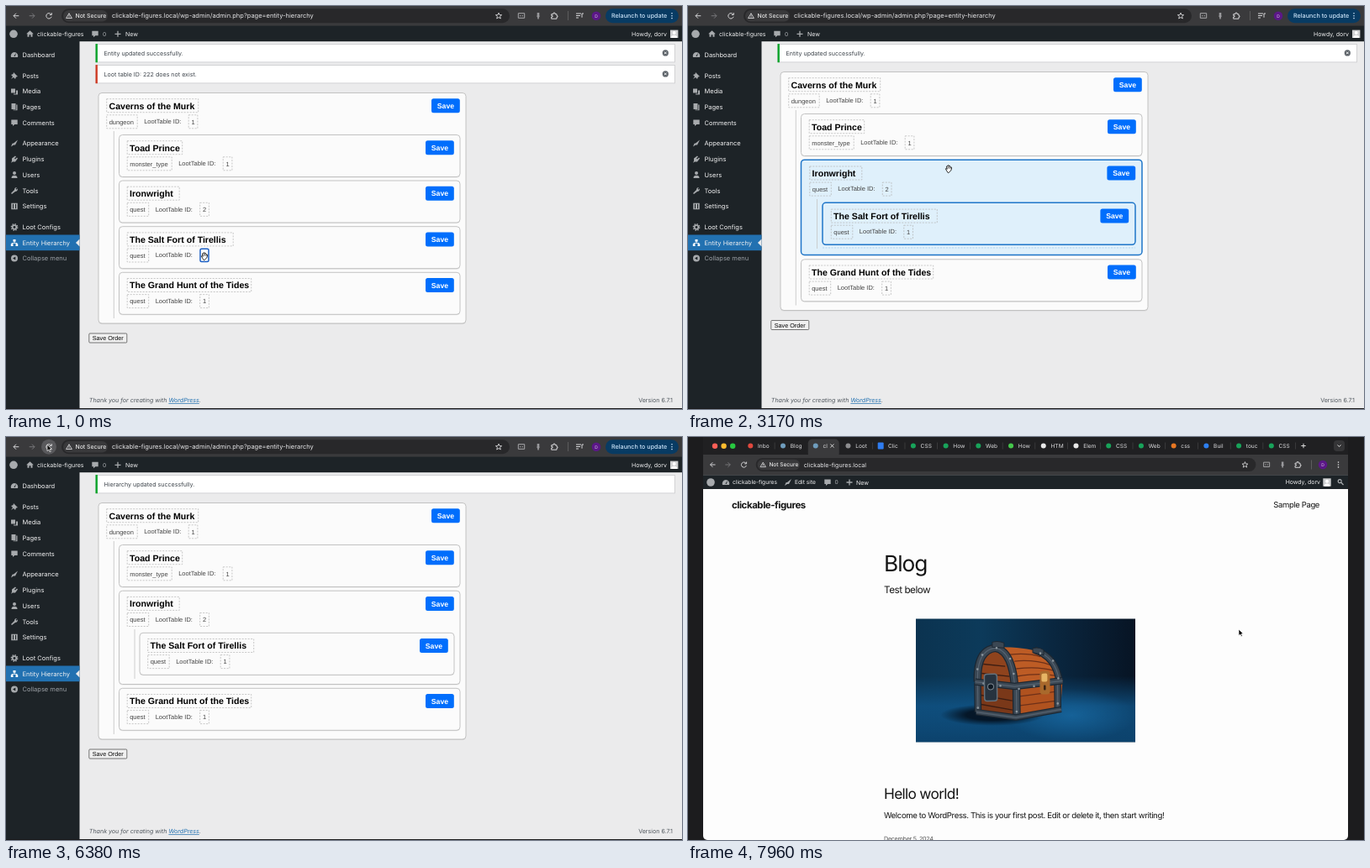
Write an HTML page that moves like this. It is 804 by 480 pixels and loops after 8 s.

```html
<!DOCTYPE html>
<html lang="en">
<head>
<meta charset="utf-8">
<title>Entity hierarchy</title>
<style>
  html, body { margin: 0; width: 100%; height: 100%; overflow: hidden; background: #1d1e20; }
  svg { display: block; width: 804px; height: 480px; }
  text { font-family: Inter, "Open Sans", sans-serif; text-rendering: geometricPrecision; white-space: pre; }
  .arial { font-family: "Liberation Sans", Arial, sans-serif; }
  .tight text { letter-spacing: -.04em; }
</style>
</head>
<body>
<svg viewBox="0 0 804 480">
  <g id="scene"></g>
  <g id="cursor"></g>
</svg>
<script>
const LOOP = 8000, BLOG_AT = 6670;
const SITE = 'clickable-figures', GREETING = 'Howdy, dorv';
const scene = document.getElementById('scene');
const cursor = document.getElementById('cursor');

// Drawing helpers: each returns SVG markup
const rect = (x, y, w, h, fill, more = '') =>
  `<rect x="${x}" y="${y}" width="${w}" height="${h}" fill="${fill}" ${more}/>`;
const circle = (x, y, r, fill, more = '') => `<circle cx="${x}" cy="${y}" r="${r}" fill="${fill}" ${more}/>`;
const path = (d, fill, more = '') => `<path d="${d}" fill="${fill}" ${more}/>`;
const line = (d, stroke, width = 1, more = '') => path(d, 'none', `stroke="${stroke}" stroke-width="${width}" ${more}`);
const at = (x, y, body, scale = 1) => `<g transform="translate(${x} ${y}) scale(${scale})">${body}</g>`;
// y is the vertical middle of the capitals
const text = (x, y, str, size, fill, more = '') =>
  `<text x="${x}" y="${y + size * 0.36}" font-size="${size}" fill="${fill}" ${more}>${str}</text>`;
const arial = (x, y, str, size, fill, more = '') => text(x, y, str, size, fill, `class="arial" ${more}`);

// Small icons, centred on the origin
const icon = {
  pin: 'M-1-4L4 1L2 1.5L1 4L-1 2L-4 4L-2 1L-4-1L-1.5-2Z',
  media: 'M-4-3H1V2H-4ZM2-1H4V4H-1V3H2Z',
  pages: 'M-3.5-4H1.5V3H-3.5ZM2.2-2.5H3.5V4.2H-1.5V3.5H2.2Z',
  comment: 'M-3.7-3.5H3.7V2H.3L-2 4V2H-3.7Z',
  brush: 'M4-4L1 2L-1 2L-4 4L-2.5 .3L-1 0Z',
  plug: 'M1-4L2-3L0-1L1 0L3-2L4-1L1 3H-2L-4 4.3L-3 2V-1Z',
  user: 'M0-4A2 2 0 0 1 0 0A2 2 0 0 1 0-4M-3.5 4Q-3.5 .8 0 .8T3.5 4Z',
  wrench: 'M-4 3L0-1Q0-4 3-4L1.5-2.2L2.5-1.2L4-2.8Q4 1 1 1L-3 4Z',
  sliders: 'M-3.7-3.7H3.7V3.7H-3.7ZM-2-2.7V2.7H-1V-2.7ZM1-2.7V2.7H2V-2.7Z',
  tree: 'M-1.5-4H1.5V-1.2H.4V0H3.3V1.2H4.2V4H1.5V1.2H2.4V.8H-2.4V1.2H-1.5V4H-4.2V1.2H-3.3V0H-.4V-1.2H-1.5Z',
  home: 'M0-4L4.3 0H3V3.5H1V1H-1V3.5H-3V0H-4.3Z',
  dial: 'M-4 3A4.3 4.3 0 1 1 4 3ZM-.6 1.6L2-2L.8 2Z',
  collapse: 'M0-4A4 4 0 0 1 0 4A4 4 0 0 1 0-4M1.3-2L-2 0L1.3 2Z',
  star: 'M0-3.6L1-1.1L3.6-1L1.6 .7L2.3 3.3L0 1.8L-2.3 3.3L-1.6 .7L-3.6-1L-1-1.1Z',
};
const glyph = (name, x, y, fill = '#a7aaad') => at(x, y, path(icon[name], fill, 'fill-rule="evenodd"'));
const gear = (x, y) => circle(x, y, 2.3, 'none', 'stroke="#a7aaad" stroke-width="1.7"') +
  circle(x, y, 3.7, 'none', 'stroke="#a7aaad" stroke-width="1.4" stroke-dasharray="1.45 1.45"');

// Navigation buttons, address pill and extension icons, centred on y = 0
function addressBar({ pillW, url, starX, loading, hover }) {
  const c = '#d6d6d8';
  return rect(66, -8.5, pillW, 17, '#28282a', 'rx="8.5"') +
    rect(68, -6.7, 53, 13.4, '#39393b', 'rx="6.7"') +
    at(75, 0, line('M0-3L3.4 2.8H-3.4ZM0-1V1.1M0 1.6V2.2', c, .9)) +
    text(82.5, 0, 'Not Secure', 6.9, '#e8e8e8', 'font-weight="500"') +
    text(126, 0, url, 7.5, '#e6e6e8') +
    at(12, 0, line('M3.3 0H-3M0-3L-3 0L0 3', c)) +
    at(31, 0, line('M-3.3 0H3M0-3L3 0L0 3', '#77777a')) +
    (hover ? circle(51, 0, 9, '#59595c') : '') +
    at(51, 0, loading ? line('M-2.8-2.8L2.8 2.8M2.8-2.8L-2.8 2.8', c)
      : line('M2.6-1.8A3.2 3.2 0 1 0 3.1 1M3.3-3.6V-1.2H.9', c)) +
    at(starX, 0, line(icon.star, c, .9)) +
    at(starX + 27, 0, line('M-3.7-3H3.7V2.6H-3.7ZM-2 0H-.6M.7 0H2', '#a8a8aa')) +
    at(starX + 47, 0, path('M-1.3-3.6H1.3V0H2L.8 2V3.7H-.8V2L-2 0H-1.3Z', '#99999c')) +
    at(starX + 66, 0, line('M-3.3-2H-1V-3.5H1V-2H3V0H4V1.5H3V3.5H-3.3V1.3H-2V-.3H-3.3Z', c));
}

const profile = (x, y) => circle(x, y, 5.3, '#5b1787') + text(x, y, 'D', 5, '#e4d0f0', 'text-anchor="middle"');
const moreDots = (x, y, fill) => [-2.9, 0, 2.9].map(d => circle(x, y + d, .8, fill)).join('');

function adminBar(y, x, edit) {
  const c = '#a7aaad', ink = '#f0f0f1';
  const next = x + (edit ? 157 : 97);
  return circle(x, y, 4.8, '#a7aaad') +
    (edit ? glyph('dial', x + 18, y) : glyph('home', x + 19.5, y)) +
    text(x + (edit ? 26 : 28), y, SITE, edit ? 6.7 : 7, ink) +
    (edit ? glyph('brush', x + 92, y) + text(x + 100, y, 'Edit site', 6.7, ink) : '') +
    glyph('comment', next - (edit ? 18 : 0), y) + text(next - (edit ? 9.5 : -9), y, '0', 6.7, c) +
    at(next + (edit ? 8 : 27), y, line('M-3.5 0H3.5M0-3.5V3.5', c, 1.3)) +
    text(next + (edit ? 16 : 36), y, 'New', 7, ink);
}

const avatar = (x, y) => at(x, y, rect(-4.7, -4.7, 9.4, 9.4, '#cfd0d2') + circle(0, -1.3, 2, '#fff') +
  path('M-3.4 4.7Q-3.4 1.5 0 1.5T3.4 4.7Z', '#fff'));

const menu = [
  ['Dashboard', 58, 'dial'], ['Posts', 83, 'pin'], ['Media', 101.5, 'media'], ['Pages', 120, 'pages'],
  ['Comments', 139, 'comment'], ['Appearance', 163.5, 'brush'], ['Plugins', 182.5, 'plug'],
  ['Users', 201, 'user'], ['Tools', 220, 'wrench'], ['Settings', 238.5, 'sliders'],
  ['Loot Configs', 263.5, 'gear'], ['Entity Hierarchy', 282, 'tree'], ['Collapse menu', 300.5, 'collapse'],
];

function sidebar() {
  return rect(0, 42, 87.5, 438, '#1d2327') + rect(0, 272.5, 87.5, 18.7, '#2271b1') +
    path('M87.5 277.5L83 282L87.5 286.5Z', '#ebebec') +
    menu.map(([label, y, name]) => {
      const ink = name === 'collapse' ? '#9ca1a7' : '#f0f0f1';
      return (name === 'gear' ? gear(10, y) : glyph(name, 10, y, name === 'tree' ? '#fff' : undefined)) +
        text(19.5, y, label, 7.5, ink);
    }).join('');
}

function notice(y, message, color, closable = true) {
  return rect(107, y, 688.5, 21.5, '#fff', 'stroke="#c3c4c7" stroke-width=".7"') +
    rect(106.5, y - .3, 2.4, 22.1, color) + text(116.5, y + 10.7, message, 7.1, '#3c434a') +
    (closable ? circle(784.3, y + 10.5, 3.6, '#5d6369') +
      at(784.3, y + 10.5, line('M-1.4-1.4L1.4 1.4M1.4-1.4L-1.4 1.4', '#fff', .9)) : '');
}

const dashed = (x, y, w, h) => rect(x, y, w, h, 'none', 'stroke="#b2b2b2" stroke-width=".7" stroke-dasharray="2 1.5"');

const typeWidth = { dungeon: 36.5, monster_type: 53, quest: 25.5 };
const entities = {
  place: { title: 'Caverns of the Murk', titleW: 109, type: 'dungeon', loot: 1 },
  foe: { title: 'Toad Prince', titleW: 65.5, type: 'monster_type', loot: 1 },
  smith: { title: 'Ironwright', titleW: 62, type: 'quest', loot: 2 },
  city: { title: 'The Salt Fort of Tirellis', titleW: 126, type: 'quest', loot: 1 },
  ages: { title: 'The Grand Hunt of the Tides', titleW: 147.5, type: 'quest', loot: 1 },
};

function card(key, x, y, right, h, { active, focused } = {}) {
  const { title, titleW, type, loot } = entities[key];
  const inset = active ? .6 : 0, w = typeWidth[type];
  const left = x + 9.7 + inset, top = y + inset, idX = left + w + 61;
  return rect(x, y + 1, right - x, h, '#000', 'rx="4" opacity=".09"') +
    rect(x, y, right - x, h, active ? '#dff0fb' : '#fbfbfb',
      `rx="4" stroke="${active ? '#1f76c9' : '#bdbdbd'}" stroke-width="${active ? 1.5 : .9}"`) +
    dashed(left, top + 7.2, titleW, 16) +
    arial(left + 2.8, top + 15.3, title, 10.6, '#000', 'font-weight="700"') +
    dashed(left, top + 26.3, w, 16) + arial(left + 3, top + 34.4, type, 7.5, '#444') +
    arial(left + w + 8, top + 33.8, 'LootTable ID:', 7.5, '#444') +
    (focused ? rect(idX + .3, top + 26.6, 10, 15.2, '#fff', 'rx="1.5" stroke="#1b5fc4" stroke-width="1.5"')
      : dashed(idX, top + 26.3, 10.7, 16)) +
    arial(idX + 3.2, top + 34.3, loot, 7.5, '#444') +
    rect(right - 41 - inset, top + 6.7, 33.8, 17, '#006efc', 'rx="2.5"') +
    arial(right - 24.1 - inset, top + 15.3, 'Save', 8.7, '#fff', 'font-weight="700" text-anchor="middle"');
}

function hierarchy({ nested, active, focused, pressed }) {
  const grow = nested ? (active ? 9.5 : 7) : 0;
  const guide = (x, y, end) => line(`M${x} ${y}V${end}`, '#c9c9c9', .9);
  let s = card('place', 110, 78.5, 547, 274.5 + grow) + guide(128.3, 124, 347 + grow) +
    card('foe', 134.5, 128.5, 540, 50);
  if (nested) {
    const n = active ? 1 : 0;
    s += card('smith', 134.5, 183.2, 540, active ? 113.3 : 111.3, { active }) +
      guide(153 + n * .5, 229 + n, 288 + n) + card('city', 159 + n, 233.3 + n, 533 - n, 50, { active });
    if (active) s += line('M160 288H532', '#9fc8ea', .7, 'stroke-dasharray="2 1.5"');
  } else {
    s += card('smith', 134.5, 183, 540, 50) + card('city', 134.5, 237.7, 540, 50, { focused });
  }
  s += card('ages', 134.5, 292.3 + grow, 540, 50);
  const y = 365 + grow;
  return s + rect(98.8, y, 45, 11, pressed ? '#d2d2d2' : '#f0f0f0', 'rx="1" stroke="#555" stroke-width=".8"') +
    arial(121.2, y + 5.5, 'Save Order', 7.2, '#000', 'text-anchor="middle"');
}

function adminPage(state) {
  const { warned, saved, loading, hover } = state;
  return rect(0, 0, 804, 480, '#ebebec') + rect(0, 0, 804, 24, '#3a3a3c') +
    at(0, 11.7, addressBar({ pillW: 533, starX: 586, loading, hover,
      url: SITE + '.local/wp-admin/admin.php?page=entity-hierarchy' })) +
    rect(668, 6, .8, 11, '#666') + at(682, 11.7, line('M-4-2.7H2M-4-.2H1M-4 2.3H-1M3 2V-2.7H5', '#d6d6d8')) +
    profile(702, 11.7) + rect(713, 3.2, 87, 17, '#083b63', 'rx="8.5"') +
    text(720, 11.7, 'Relaunch to update', 7.2, '#cfe6fb', 'font-weight="500"') + moreDots(792, 11.7, '#cfe6fb') +
    rect(0, 23.6, 804, 18.6, '#1d2327') + adminBar(33.3, 9, false) +
    text(786, 33.3, GREETING, 7, '#f0f0f1', 'text-anchor="end"') + avatar(794.7, 33.3) +
    sidebar() +
    notice(45.4, `${saved ? 'Hierarchy' : 'Entity'} updated successfully.`, '#00a32a', !saved) +
    (warned ? notice(70.4, 'Loot table ID: 222 does not exist.', '#cf3c26') : '') +
    at(0, warned ? 25 : 0, hierarchy(state)) +
    text(98.8, 469.5, 'Thank you for creating with <tspan fill="#2271b1" text-decoration="underline">WordPress</tspan>.',
      7.1, '#50575e', 'font-style="italic"') +
    text(793, 469.5, 'Version 6.7.1', 7.1, '#50575e', 'text-anchor="end"') + rect(0, 479, 804, 1, '#1a1a1b');
}

const tabs = [
  ['Inbo', '#e0483e'], ['Blog', '#6f9dbd'], ['cl', '#6f9dbd'], ['Loot', '#8d8d8f'], ['Clic', '#2f7cf0'],
  ['CSS', '#18a35a'], ['How', '#18a35a'], ['Web', '#18a35a'], ['How', '#45c84b'], ['HTM', '#e8e8e8'],
  ['Elem', '#e8e8e8'], ['CSS', '#18a35a'], ['Web', '#18a35a'], ['css', '#e87722'], ['Buil', '#2d7ff0'],
  ['touc', '#18a35a'], ['CSS', '#18a35a'],
];

function tab([label, color], i) {
  const x = 74.3 + i * 38.72, open = i === 2;
  return (open ? rect(x - 9, 2.5, 37, 22, '#3a3a3c', 'rx="5"') : '') +
    (label === 'Clic' ? rect(x - 3.5, 6.5, 7, 8, color, 'rx="1"') : circle(x, 10.5, 3, color)) +
    text(x + 8.7, 10.5, label, 6.6, '#dedee0') +
    (open ? at(x + 19.7, 10.5, line('M-2-2L2 2M2-2L-2 2', '#eee', .9))
      : i !== 1 ? rect(x + 28.5, 6.5, .6, 8, '#4b4b4d') : '');
}

function chest() {
  const strap = (d, w) => line(d, '#1c2732', w + 1.5, 'stroke-linejoin="round"') +
    line(d, '#3b4753', w - 1) + line(d, '#566370', 1.2);
  const rivets = [[345, 276], [351, 259], [368, 251], [384, 264], [388, 282], [345, 322], [391, 327], [440, 318],
    [441, 288], [394, 300], [412, 297], [435, 267], [420, 258], [352, 293], [372, 296]];
  return path('M366 250Q412 250 428 261Q443 273 446 291L388 297Z', '#bd5c25') +
    path('M342 291Q341 252 366 250Q387 254 388 297Z', '#8f431d') +
    path('M342 291L388 297V336L344 329Z', '#7a3819') + path('M388 297L446 291L443 327L388 336Z', '#b0521f') +
    line('M384 259Q405 257 420 262M389 267Q412 265 432 272M391 276Q418 273 436 279M392 285Q420 281 438 285', '#6e3018', 1.3) +
    line('M352 270L378 273M350 281L383 285M349 307L386 314M349 318L386 325', '#3d1d12', 1.4) +
    line('M395 309L437 304M395 320L437 315', '#6e3018', 1.3) +
    strap('M413 254Q438 262 442 291', 7) + strap('M345 291Q344 253 367 251Q386 255 389 296', 8) +
    strap('M345 292V327', 7) + strap('M391 298V335', 8) + strap('M440 292V326', 7) +
    strap('M343 327L390 334L444 325', 6) + strap('M342 291L389 297L446 291', 7) +
    path('M363 250V244Q370 242 377 245V251ZM411 257V252Q418 250 424 254V260Z', '#3b4753', 'stroke="#1c2732"') +
    rivets.map(([x, y]) => circle(x, y, 1.3, '#8d979e')).join('') +
    rect(353, 282, 15, 32, '#27333f', 'rx="3" stroke="#64717c" stroke-width="1.5"') +
    circle(360.5, 297, 3.5, '#101a24', 'stroke="#7b8790"') +
    rect(419, 279, 12, 28, '#a9692c', 'rx="4"') + rect(421, 282, 7, 10, '#e6b565', 'rx="2"') +
    rect(423.5, 296, 2.5, 6, '#3a2413', 'rx="1"');
}

const photoFills = `<defs>
  <linearGradient id="wall"><stop stop-color="#0b3350"/><stop offset=".3" stop-color="#0c3a5a"/>
    <stop offset=".62" stop-color="#0a2740"/><stop offset="1" stop-color="#071424"/></linearGradient>
  <linearGradient id="floor" x2="0" y2="1"><stop stop-color="#10568a" stop-opacity="0"/>
    <stop offset=".45" stop-color="#10568a" stop-opacity=".75"/><stop offset="1" stop-color="#0c426c"/></linearGradient>
  <radialGradient id="glow"><stop stop-color="#1c76b4"/><stop offset="1" stop-color="#1c76b4" stop-opacity="0"/></radialGradient>
  <radialGradient id="shade"><stop offset=".5" stop-color="#04111f" stop-opacity=".9"/>
    <stop offset="1" stop-color="#04111f" stop-opacity="0"/></radialGradient>
</defs>`;

function photo() {
  return photoFills + rect(271, 216.5, 261, 146.8, 'url(#wall)') + rect(271, 285, 261, 78.3, 'url(#floor)') +
    rect(380, 300, 152, 63, 'url(#glow)', 'opacity=".55"') +
    '<ellipse cx="362" cy="331" rx="62" ry="13" fill="url(#shade)"/>' + `<g id="chest">${chest()}</g>`;
}

function blogPage() {
  const ink = '#151515';
  return rect(0, 0, 804, 480, '#1c1c1e') + rect(18, 0, 767, 480, '#fdfdfd', 'rx="5"') +
    rect(18, 0, 767, 22, '#202022') +
    ['#ff5f57', '#febc2e', '#28c840'].map((c, i) => circle(32 + i * 10.6, 10.7, 3.2, c)).join('') +
    tabs.map(tab).join('') +
    at(732, 10.5, line('M-2.7 0H2.7M0-2.7V2.7', '#ddd')) + rect(768, 4, 13, 13, '#353537', 'rx="4"') +
    at(774.5, 10.5, line('M-2-1L0 1L2-1', '#ddd')) +
    rect(18, 21, 767, 24.5, '#3a3a3c') +
    at(18, 33, addressBar({ pillW: 626, starX: 678.4, url: SITE + '.local' }), .95) +
    rect(741, 27.5, .8, 11, '#666') + profile(755, 33) + moreDots(773.5, 33, '#ddd') +
    rect(18, 45.3, 767, 16.7, '#1d2327') + adminBar(54, 27, true) +
    text(752, 54, GREETING, 6.9, '#f0f0f1', 'text-anchor="end"') + avatar(760, 54) +
    at(776, 53.5, line('M.8 .8L3.5 3.5M1.2-.8A2 2 0 1 1 1.2-.9', '#a7aaad', 1.3)) +
    photo() +
    '<g class="tight">' + text(52, 81, SITE, 11.5, ink, 'font-weight="700"') +
    text(751, 81, 'Sample Page', 9.5, ink, 'text-anchor="end"') +
    text(233, 150.5, 'Blog', 26.3, ink) + text(233, 182, 'Test below', 11.7, ink) +
    text(233, 425, 'Hello world!', 17.3, ink) +
    text(233, 451, 'Welcome to WordPress. This is your first post. Edit or delete it, then start writing!', 9.65, ink) +
    text(233, 478.5, 'December 5, 2024', 7.2, '#555') + '</g>';
}

// Pointer path: time, x, y
const track = [
  [0, 236, 298], [450, 236, 298], [850, 515, 279], [1250, 515, 279], [2100, 212, 220], [2350, 212, 220],
  [2650, 262, 262], [3050, 310, 194], [3750, 310, 194], [4450, 113, 378], [5000, 113, 378], [6000, 49, 9],
  [6669, 49, 9], [6670, 585, 262], [7380, 612, 240], [7960, 655, 229], [LOOP, 655, 229],
];
const arrow = path('M0 0V7.6L1.8 6L3 8.7L4.3 8.1L3.1 5.5H5.5Z', '#000', 'stroke="#fff" stroke-width=".7"');
const hand = path('M-3.6-.2Q-2.8-1-1.8 .4L-2.5-3Q-1.7-4.3-1-3V-3.8Q-.2-5 .6-3.8V-3Q1.5-4.2 2.1-2.8V-1.8Q3.4-2.6 3.6-1.2Q4 2-.1 4.6H-.8Q-2.5 2.4-3.6-.2Z',
  '#fff', 'stroke="#111" stroke-width=".9"') + line('M-.9-2.8V-.4M.6-2.8V-.4M2.1-2V-.2', '#111', .6);

function pointerAt(t) {
  const i = track.findIndex(([time], n) => n > 0 && t <= time);
  const [t0, x0, y0] = track[i - 1], [t1, x1, y1] = track[i];
  const u = (t - t0) / (t1 - t0), e = u * u * (3 - 2 * u);
  return [x0 + (x1 - x0) * e, y0 + (y1 - y0) * e];
}

const within = (t, from, to) => t >= from && t < to;
const stateAt = t => ({
  blog: t >= BLOG_AT,
  warned: t < 1350,
  focused: t < 900,
  loading: within(t, 950, 1350) || within(t, 4600, 5300),
  nested: t >= 3050,
  active: within(t, 3050, 3750),
  pressed: within(t, 4600, 4800),
  saved: t >= 5300,
  hover: within(t, 5900, BLOG_AT),
  hand: t < 3850,
});

let shown = '';
function draw() {
  const t = performance.now() % LOOP, state = stateAt(t), key = JSON.stringify(state);
  if (key !== shown) {
    shown = key;
    scene.innerHTML = state.blog ? blogPage() : adminPage(state);
    cursor.innerHTML = state.hand ? hand : arrow;
  }
  cursor.setAttribute('transform', `translate(${pointerAt(t)})`);
  if (state.blog) {
    const tilt = -.7 * Math.sin((t - 7380) / 1160 * Math.PI);
    document.getElementById('chest').setAttribute('transform', `rotate(${tilt} 392 335)`);
  }
  requestAnimationFrame(draw);
}
draw();
</script>
</body>
</html>
```
